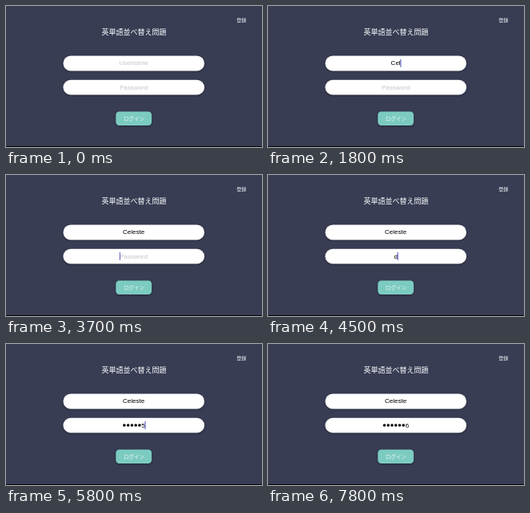
These frames come from a looping animation (320 by 177 pixels, 8000 ms). An HTML page with a canvas:

```html
<!DOCTYPE html>
<html lang="ja">
<head>
<meta charset="utf-8">
<title>英単語並べ替え問題</title>
<style>
  html, body { margin: 0; width: 100%; height: 100%; overflow: hidden; background: #383d54; }
  canvas { display: block; width: 100vw; height: 100vh; }
</style>
</head>
<body>
<canvas></canvas>
<script>
const W = 320, H = 177, LOOP = 8000, MID = 159.6;
const INK = '#000', HINT = '#c3c3c8';
const LATIN = '8px "Liberation Sans", Arial, sans-serif';
const cjk = size => `${size}px "Noto Sans CJK JP", "Noto Sans CJK", sans-serif`;

const canvas = document.querySelector('canvas');
const ctx = canvas.getContext('2d');

// Times in ms: when the field gets focus, its first key, and the gap between keys
const fields = [
  { hint: 'Username', value: 'Celeste', y: 71.8, focus: 1200, first: 1400, gap: 180 },
  { hint: 'Password', value: 'd123456', y: 102, focus: 3100, first: 4480, gap: 260, secret: true }
];

const clamp = (v, lo, hi) => Math.min(hi, Math.max(lo, v));

const typed = (f, t) => clamp(Math.floor((t - f.first) / f.gap) + 1, 0, f.value.length);

// Solid after the last key or focus, then fading off and on once a second
function caretAlpha(f, t) {
  const n = typed(f, t);
  const last = n ? f.first + (n - 1) * f.gap : f.focus;
  const age = t - last - 540;
  return age < 0 ? 1 : clamp((Math.abs(age % 1000 - 380) - 190) / 150, 0, 1);
}

function pill(x, y, w, h, r, fill) {
  ctx.save();
  ctx.shadowColor = 'rgba(0,0,0,.45)';
  ctx.shadowBlur = 2.5 * canvas.width / W;
  ctx.shadowOffsetY = .7 * canvas.height / H;
  ctx.fillStyle = fill;
  ctx.beginPath();
  ctx.roundRect(x, y, w, h, r);
  ctx.fill();
  ctx.restore();
}

function text(str, x, y, font, fill, align = 'center') {
  ctx.font = font;
  ctx.fillStyle = fill;
  ctx.textAlign = align;
  ctx.fillText(str, x, y);
  return ctx.measureText(str).width;
}

// Both return the x where the caret belongs
function plainText(str, hint, y) {
  const w = text(str || hint, MID, y + 2.5, LATIN, str ? INK : HINT);
  return MID + (str ? w : -w) / 2;
}

function secretText(str, y) {
  const pitch = 4.75, dots = str.length - 1;
  const left = MID - (dots * pitch + 4.4) / 2;
  const tail = left + dots * pitch;
  ctx.fillStyle = INK;
  for (let i = 0; i < dots; i++) {
    ctx.beginPath();
    ctx.arc(left + (i + .5) * pitch, y, 1.8, 0, Math.PI * 2);
    ctx.fill();
  }
  return tail + text(str[dots], tail, y + 2.5, LATIN, INK, 'left');
}

function drawField(f, t, focused) {
  pill(71.5, f.y - 9.2, 176.5, 18.8, 9.4, '#fff');
  const str = f.value.slice(0, typed(f, t));
  const end = f.secret && str ? secretText(str, f.y) : plainText(str, f.hint, f.y);
  if (!focused) return;
  ctx.globalAlpha = caretAlpha(f, t);
  ctx.fillStyle = '#3f48b5';
  ctx.fillRect(end - .2, f.y - 5, 1, 10);
  ctx.globalAlpha = 1;
}

function draw(t) {
  ctx.setTransform(canvas.width / W, 0, 0, canvas.height / H, 0, 0);
  ctx.fillStyle = '#383d54';
  ctx.fillRect(0, 0, W, H);
  ctx.fillStyle = '#000';
  ctx.fillRect(0, 176, W, 1);

  text('登録', 294.2, 20.2, cjk(6), '#f4f4f8');
  text('英単語並べ替え問題', 159.9, 36.2, cjk(9), '#fff');

  const active = fields.findLast(f => t >= f.focus);
  fields.forEach(f => drawField(f, t, f === active));

  pill(137.3, 132.6, 44.8, 17.4, 4.2, '#7ccbc1');
  text('ログイン', 160, 143.5, cjk(6.5), '#eaf8f6');
}

function resize() {
  const dpr = window.devicePixelRatio || 1;
  canvas.width = Math.round(innerWidth * dpr);
  canvas.height = Math.round(innerHeight * dpr);
}

const start = performance.now();
function frame() {
  draw((performance.now() - start) % LOOP);
  requestAnimationFrame(frame);
}

addEventListener('resize', resize);
resize();
frame();
</script>
</body>
</html>
```
